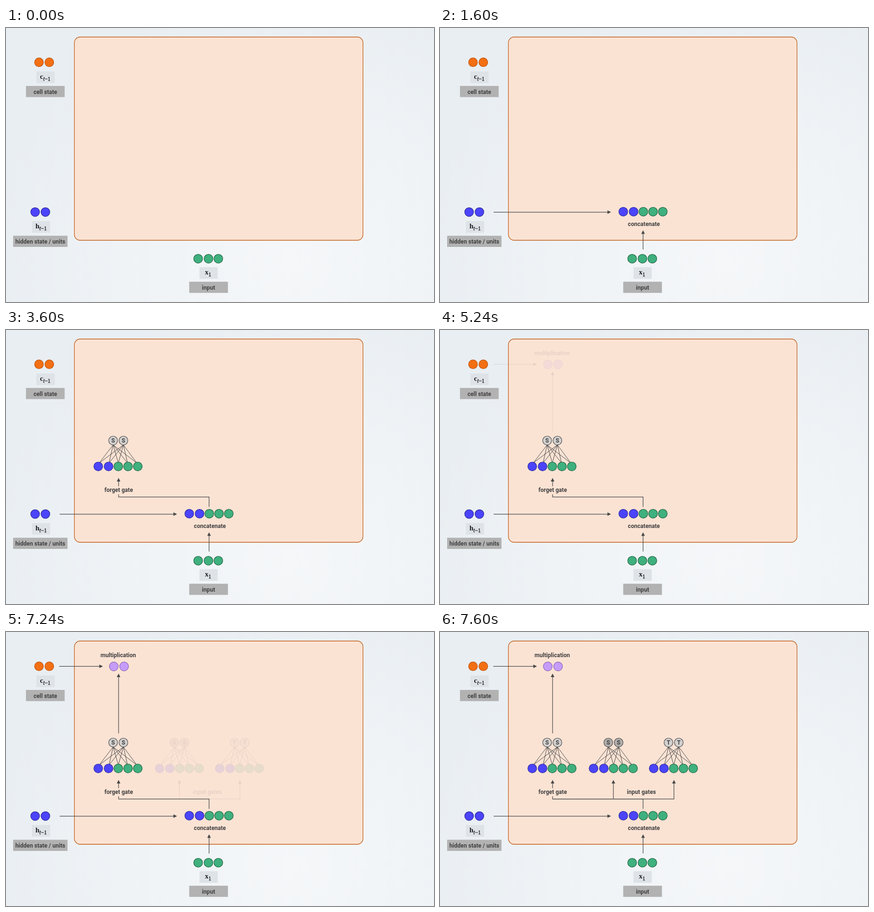
Write an HTML page that moves like this. It is 901 px wide and 577 px high and loops after 8000 ms.

```html
<!DOCTYPE html>
<html lang="en">
<head>
<meta charset="utf-8">
<style>
html, body { margin: 0; width: 100%; height: 100%; overflow: hidden; }
body { background: radial-gradient(ellipse 640px 560px at 600px 490px, #f5f7f9, #eff3f6 55%, #e9eef2); }
svg { display: block; }
text { font: 600 12.1px Roboto, sans-serif; fill: #414141; text-anchor: middle; }
.math { font: 700 15px "Liberation Serif", serif; fill: #1c1c1c; text-anchor: start; }
.sub { font-size: 11.5px; font-weight: 400; stroke: #1c1c1c; stroke-width: .3px; }
.it { font-style: italic; }
.wire { fill: none; stroke: #484848; stroke-width: 1.25; }
.head { fill: #484848; }
</style>
</head>
<body>
<svg id="stage" width="901" height="577" viewBox="0 0 901 577"></svg>
<script>
const COLORS = {
  orange: ['#f36f13', '#bd5510'],
  blue: ['#4b44fa', '#302b9c'],
  green: ['#3fb07e', '#216443'],
  purple: ['#c69cfb', '#8b66b5'],
  light: ['#d2d0ce', '#505050'],
  dark: ['#b0adab', '#505050'],
};

const text = (x, y, s) => `<text x="${x}" y="${y}">${s}</text>`;
const rect = (x, y, w, h, fill) => `<rect x="${x}" y="${y}" width="${w}" height="${h}" fill="${fill}"/>`;
const wire = d => `<path class="wire" d="${d}"/>`;

function dot(x, y, color) {
  const [fill, stroke] = COLORS[color];
  return `<circle cx="${x}" cy="${y}" r="9.3" fill="${fill}" stroke="${stroke}" stroke-width="1.2"/>`;
}

const dots = (xs, y, color) => xs.map(x => dot(x, y, color)).join('');

const arrowRight = (x1, x2, y) =>
  wire(`M${x1} ${y}H${x2 - 6}`) + `<path class="head" d="M${x2} ${y}l-7.5 -3.8v7.6z"/>`;

const arrowUp = (x, y1, y2) =>
  wire(`M${x} ${y1}V${y2 + 6}`) + `<path class="head" d="M${x} ${y2}l-3.8 7.5h7.6z"/>`;

function vector(x, y) {
  return dots([x, x + 21.7], y, 'blue') + dots([42.2, 62.7, 83.2].map(d => x + d), y, 'green');
}

// Two activation units fully connected to a five-part vector.
function gate(x, topX, letter, color) {
  const tops = [topX, topX + 21.7];
  const lines = tops.map(t =>
    [0, 21.7, 42.2, 62.7, 83.2].map(d => `M${t} 242L${x + d + (41.6 - d) * .05} 280`).join('')).join('');
  return wire(lines).replace('/>', ' style="stroke-width:1"/>') + vector(x, 287.3) +
    tops.map(t => dot(t, 232.8, color) + text(t, 237.1, letter)).join('');
}

function symbol(x, y, name, sub) {
  return rect(x, y, 38.5, 24.5, '#dee3e8') +
    `<text class="math" x="${x + (sub ? 7.5 : 11.5)}" y="${y + 15.5}">${name}` +
    (sub ? '<tspan class="sub it" dy="3.5">t</tspan><tspan class="sub">−1</tspan>'
         : '<tspan class="sub" dy="3.5">1</tspan>') + '</text>';
}

const caption = (x, y, w, s) => rect(x, y, w, 23.5, '#b2b2b2') + text(x + w / 2, y + 16.5, s);

const base =
  '<rect x="144" y="19" width="607.5" height="428" rx="12" fill="#fbe3d4" stroke="#c2601c" stroke-width="1.3"/>' +
  dots([69.5, 91.2], 72.2, 'orange') + symbol(64, 91.5, 'c', true) + caption(42, 122, 81.5, 'cell state') +
  dots([61.3, 83], 387.6, 'blue') + symbol(54.5, 406.5, 'h', true) + caption(15, 437.5, 114.5, 'hidden state / units') +
  dots([404.5, 426.2, 447], 485.8, 'green') + symbol(407.3, 503.7, 'x', false) + caption(385.7, 534.3, 81.5, 'input');

const steps = [
  [1240, arrowRight(113, 360, 387.8) + arrowUp(427.5, 466.5, 426) +
    vector(385.8, 386.8) + text(429.2, 416.6, 'concatenate')],
  [3240, wire('M427.5 372.5V351.7H237V346') + arrowUp(237, 329, 311.5) +
    text(237.2, 341.3, 'forget gate') + gate(194.2, 225.5, 'S', 'light')],
  [5240, arrowRight(112, 204, 72.3) + arrowUp(237, 213.5, 87.5) +
    dots([226.9, 248.6], 72.5, 'purple') + text(236.3, 53, 'multiplication')],
  [7240, wire('M237 351.7H492.5') + arrowUp(365, 351.7, 311.5) + arrowUp(492.5, 352.3, 311.5) +
    text(424, 341.3, 'input gates') + gate(323.2, 354.3, 'S', 'dark') + gate(449.8, 481, 'T', 'light')],
];

const stage = document.getElementById('stage');
stage.innerHTML = base + steps.map(([, art]) => `<g class="step" opacity="0">${art}</g>`).join('');
const layers = stage.querySelectorAll('.step');

// Each layer fades in over ten steps of 40 ms.
function draw() {
  const t = performance.now() % 8000;
  steps.forEach(([start], i) => {
    const n = Math.floor((t - start) / 40) + 1;
    layers[i].setAttribute('opacity', Math.max(0, Math.min(1, n / 10)));
  });
  requestAnimationFrame(draw);
}
draw();
</script>
</body>
</html>
```
